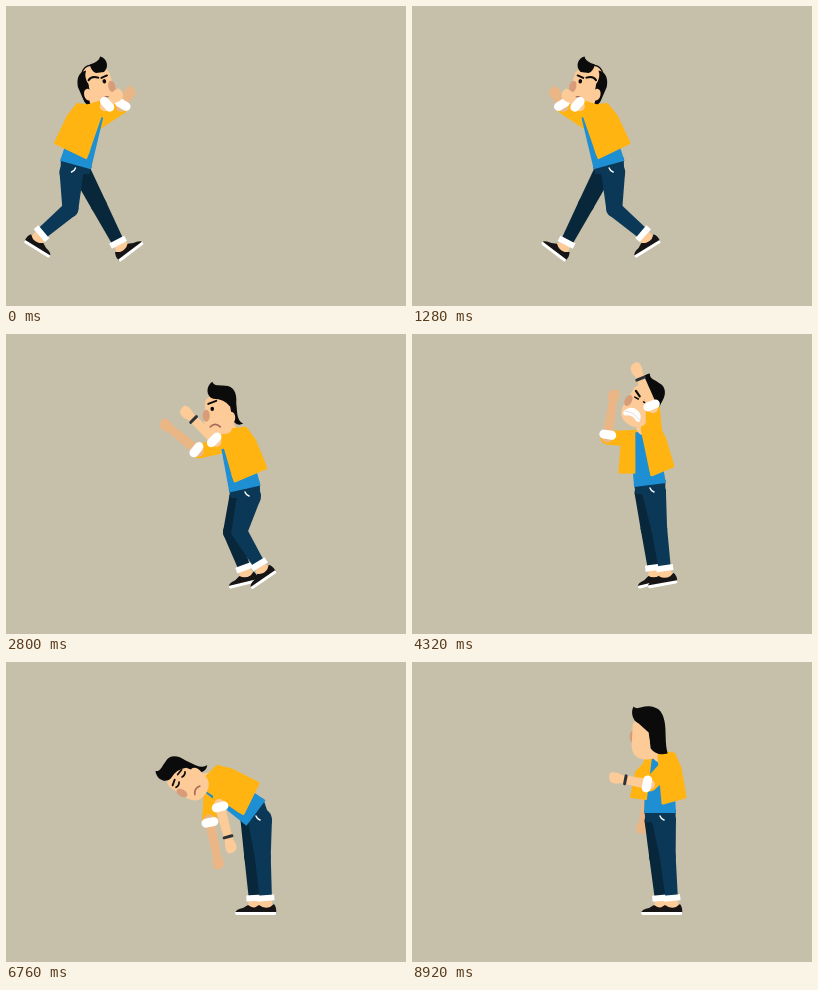
Recreate the animation shown at these times as an HTML page with a canvas. Size 400 by 300 pixels, loop 8960 ms.

```html
<!DOCTYPE html>
<html lang="en">
<head>
<meta charset="utf-8">
<title>Pacing man</title>
<style>
html, body { margin: 0; width: 100%; height: 100%; overflow: hidden; background: #c6c0aa; }
canvas { display: block; width: 400px; height: 300px; }
</style>
</head>
<body>
<canvas id="stage"></canvas>
<script>
const LOOP = 8960, STEP = 40, SPEED = 0.28, CYCLE = 640;
const TURNS = [859, 1671, 2500];
const WALK_END = 2660, STOP = 2800, BEAT = 255;
const C = {
  bg: '#c6c0aa', coat: '#ffb412', shirt: '#1e8fd2', near: '#0c3858', far: '#08273a',
  skin: '#fccb98', shade: '#eab686', nose: '#d99c78', lip: '#a8685a', hair: '#0c0b0c',
  white: '#ffffff', shoe: '#161415', watch: '#2c3338'
};

const canvas = document.getElementById('stage');
const g = canvas.getContext('2d');
const ratio = window.devicePixelRatio || 1;
canvas.width = 400 * ratio;
canvas.height = 300 * ratio;

const clamp = v => Math.max(0, Math.min(1, v));
const smooth = v => { v = clamp(v); return v * v * (3 - 2 * v); };
const mix = (a, b, k) => Array.isArray(a) ? a.map((v, i) => mix(v, b[i], k))
  : typeof a === 'number' ? a + (b - a) * k : k < .5 ? a : b;
const blend = (p, q, k) =>
  Object.fromEntries(Object.keys(p).map(key => [key, mix(p[key], q[key], k)]));

// Ankle x, y and angle; raising the heel tips the shoe forward.
const foot = (x, heel = 0) => [x, 238 - 6 * heel, -.6 * heel];

// Arms hold upper and lower angles: 0 hangs down, a quarter turn points ahead.
const STAND = {
  x: 248, y: 151, lean: 0, tilt: 0, near: [-.2, .15], far: [.1, .2], reach: 38,
  nearFoot: foot(260), farFoot: foot(249), open: 1, mood: 'sad'
};
const CRY = { ...STAND, x: 239, y: 155, lean: -.22, near: [1.5, 2.35], far: [1.3, 2.25],
  nearFoot: foot(254, 1), farFoot: foot(239, .4), reach: 42, open: 0 };
const ROAR = { ...STAND, x: 238, lean: -.12, tilt: .5, near: [3.1, 2.75], far: [1.6, 3.3],
  nearFoot: foot(253, .3), farFoot: foot(242, .4), reach: 42, mood: 'rage' };
const SHAKE = { ...STAND, x: 252, y: 157, tilt: .5, near: [1.4, 2.87], far: [1.5, 2.97],
  nearFoot: foot(277, .4), farFoot: foot(249), reach: 36, mood: 'rage' };
const STAGGER = { ...SHAKE, x: 260, near: [.9, 2], far: [1, 2.2], nearFoot: foot(287, .3) };
const SIGH = { ...STAND, x: 251, lean: .07, tilt: .3, near: [-.7, .2], mood: 'closed' };
const BENT = { ...STAND, x: 250, lean: -.96, tilt: -1.05, near: [.15, -.26], far: [.1, -.2],
  reach: 44, open: 0, mood: 'closed' };
const CHECK = { ...STAND, tilt: -.05, near: [.8, 1.76], far: [.2, .1], reach: 35 };
const LOOK = { ...CHECK, tilt: 0, far: [.07, .2], mood: 'away' };

const tantrum = [ROAR, SHAKE, CRY];
const KEYS = [[STOP, CRY]];
for (let i = 1; i <= 10; i++) KEYS.push([STOP + i * BEAT, tantrum[i % 3]]);
KEYS.push([5640, STAGGER], [6040, STAND], [6400, SIGH], [6680, BENT], [7420, BENT],
  [7840, STAND], [8200, CHECK], [8400, CHECK], [8640, LOOK], [LOOP, LOOK]);

function walkX(t) {
  return TURNS.reduce((x, at, i) => x + (i % 2 ? 2 : -2) * SPEED * Math.max(0, t - at), 72 + SPEED * t);
}

function stride(x, phase) {
  const p = phase % 1;
  if (p < .5) {
    const push = smooth((p - .3) / .2);
    return [x + mix(-41, 38, p * 2), 238 - 9 * push, .65 * (1 - clamp(p / .12)) - .55 * push];
  }
  const s = p * 2 - 1, swing = Math.sin(Math.PI * s);
  return [x + mix(38, -41, smooth(s)), 238 - 9 * (1 - s) - 14 * swing, mix(-.55, .65, s) - .35 * swing];
}

function walkPose(t) {
  const x = walkX(t), p = t / CYCLE;
  return { ...STAND, x: x + 2.5, y: 157 + 2 * Math.cos(4 * Math.PI * p), lean: -.27, tilt: .25,
    near: [1.93, 2.3], far: [2.1, 2.6], reach: 16, open: 0, mood: 'held',
    nearFoot: stride(x, p + .5), farFoot: stride(x, p) };
}

function poseAt(t) {
  if (t < STOP) return blend(walkPose(t), CRY, smooth((t - WALK_END) / (STOP - WALK_END)));
  const i = KEYS.findIndex(k => k[0] > t);
  const [t0, a] = KEYS[i - 1], [t1, b] = KEYS[i];
  const k = (t - t0) / (t1 - t0);
  const pose = blend(a, b, smooth(k));
  if (a === BENT && b === BENT) pose.lean += .03 * Math.sin(k * 4 * Math.PI);
  return pose;
}

function fill(path, color) {
  g.fillStyle = color;
  g.fill(new Path2D(path));
}
function line(path, color, width, cap = 'round') {
  g.strokeStyle = color;
  g.lineWidth = width;
  g.lineCap = cap;
  g.lineJoin = 'round';
  g.stroke(new Path2D(path));
}
function oval(x, y, rx, ry, color) {
  g.fillStyle = color;
  g.beginPath();
  g.ellipse(x, y, rx, ry, 0, 0, 7);
  g.fill();
}
function poly(points, color, round = 0) {
  const path = 'M' + points.join('L') + 'Z';
  fill(path, color);
  if (round) line(path, color, round);
}
function at(x, y, angle, draw) {
  g.save();
  g.translate(x, y);
  g.rotate(angle);
  draw();
  g.restore();
}

// Tapered bone with round joints; the end may be cut flat.
function limb(a, b, wa, wb, color, flat) {
  const dx = b[0] - a[0], dy = b[1] - a[1], d = Math.hypot(dx, dy) || 1;
  const side = (p, w) => [p[0] - dy / d * w / 2, p[1] + dx / d * w / 2];
  poly([side(a, wa), side(b, wb), side(b, -wb), side(a, -wa)], color);
  oval(...a, wa / 2, wa / 2, color);
  if (!flat) oval(...b, wb / 2, wb / 2, color);
}

function knee(hip, ankle) {
  const up = 37, low = 40;
  const dx = ankle[0] - hip[0], dy = ankle[1] - hip[1];
  const d = Math.hypot(dx, dy), reach = Math.min(d, up + low);
  const along = (up * up - low * low + reach * reach) / (2 * reach);
  const out = Math.sqrt(Math.max(0, up * up - along * along));
  return [hip[0] + (dx * along - dy * out) / d, hip[1] + (dy * along + dx * out) / d];
}

function leg(hip, [x, y, angle], top, color) {
  const k = knee(hip, [x, y]);
  at(x, y, angle, () => {
    fill('M-5,-3 H5 L7,9 H-8 Z', C.skin);
    fill('M-20,13 Q-19,9 -12,8 L-7,5 Q-2,9 4,7 L8,4 Q11,8 10,13 Z', C.shoe);
    fill('M-20,12 H10 V14 Q10,15 8,15 H-18 Q-20,15 -20,12 Z', C.white);
  });
  limb(hip, k, top, 16, color);
  limb(k, [x, y], 16, 12, color, true);
  at(x, y, Math.atan2(y - k[1], x - k[0]) - Math.PI / 2, () =>
    line('M-5.5,-2 H5.5', C.white, 6, 'square'));
}

const swing = ([x, y], angle, length) =>
  [x - Math.sin(angle) * length, y + Math.cos(angle) * length];

function arm(shoulder, [upper, lower], reach, skin, watch) {
  const elbow = swing(shoulder, upper, 28), hand = swing(elbow, lower, reach);
  limb(shoulder, elbow, 17, 14, C.coat);
  limb(elbow, hand, 10, 8, skin);
  at(...hand, lower + Math.PI / 2, () => {
    fill('M-6,-4 Q-1,-7 4,-5 Q8,-1 6,4 Q1,7 -6,4 Z', skin);
    if (watch) line('M-10,-4 V4', C.watch, 3);
  });
  at(...elbow, lower + Math.PI / 2, () => line('M3,-4 V4', C.white, 9));
}

function face(mood) {
  oval(-13, 0, 3.5, 6, C.nose);
  if (mood === 'sad' || mood === 'held') {
    oval(-7, -7, 1.8, 2.2, C.hair);
    line(mood === 'sad' ? 'M-11,-12 L-3,-15' : 'M-11,-12 L-5,-11 M-2,-12 Q4,-16 8,-12', C.hair, 2);
    line('M-9,11 Q-4,6 1,11', C.lip, 1.6);
  } else if (mood === 'rage') {
    line('M-11,-12 L-5,-9 M9,-14 L1,-9', C.hair, 2.2);
    line('M-9,-6 H-5 M1,-6 H5', C.hair, 1.6);
    fill('M-12,12 Q-10,4 -2,4 Q6,5 7,13 Q5,16 1,13 Q-4,11 -9,15 Q-12,15 -12,12 Z', C.white);
    line('M-11,11 Q-3,7 6,12', '#ddd3cf', .7);
  } else {
    line('M-11,-8 Q-8,-6 -5,-8 M1,-8 Q4,-6 7,-8', C.hair, 1.7);
    line('M-11,-12 L-5,-13 M1,-13 L7,-12', C.hair, 1.8);
    line('M-8,12 Q-3,8 2,12', C.lip, 1.6);
  }
}

function head(x, y, angle, mood) {
  at(x, y, angle, () => {
    if (mood === 'away') oval(-14, -2, 3, 6, C.nose);
    fill('M-14,-14 Q-12,-21 0,-21 Q15,-20 15,-5 L14,10 Q11,21 0,21 Q-14,21 -15,8 Z', C.skin);
    if (mood === 'away') {
      fill('M-8,-15 C-15,-18 -16,-28 -13,-32 C-9,-27 -4,-35 8,-31 C18,-28 19,-14 19,-2 Q19,8 21,15 Q10,18 4,10 L2,-6 Z', C.hair);
      oval(-1, 3, 4, 6, C.skin);
      return;
    }
    if (mood === 'held') {
      oval(5, -16, 9, 9, C.skin);
      fill('M-9,-16 C-16,-20 -15,-29 -9,-32 Q-7,-27 3,-27 Q3,-20 -1,-17 Z', C.hair);
      fill('M8,-22 Q19,-22 20,-8 L18,5 Q17,13 12,12 Q13,6 10,2 L9,-8 Q12,-16 8,-22 Z', C.hair);
      line('M3,-26 Q9,-27 13,-20', C.hair, 1.4);
    } else {
      fill('M-6,-17 C-13,-19 -14,-29 -7,-34 C-5,-29 0,-31 6,-30 C14,-30 18,-23 17,-13 L18,-2 Q19,6 24,8 Q16,11 13,3 L11,-9 Q5,-17 -6,-17 Z', C.hair);
    }
    oval(12, 2, 4, 6, C.skin);
    face(mood);
  });
}

function man(p) {
  const { x, y, lean, open, mood } = p, size = 57;
  const cos = Math.cos(lean), sin = Math.sin(lean);
  const neck = [x + sin * size, y - cos * size];
  const body = (u, v) => [neck[0] + cos * u - sin * v, neck[1] + sin * u + cos * v];
  const nod = p.tilt - .65;
  const skull = [neck[0] + 22 * Math.sin(nod), neck[1] - 22 * Math.cos(nod)];

  arm(body(-9, 9), p.far, p.reach, C.shade, false);
  leg([x - 6, y + 7], p.farFoot, 19, C.far);
  leg([x + 4, y + 7], p.nearFoot, 24, C.near);
  poly([body(-16, size - 3), body(16, size - 3), [x + 15, y + 9], [x - 14, y + 9]], C.near);
  line(`M${x},${y + 3} q1,3 4,4`, C.white, 1.4);

  poly([body(-14, 4), body(13, 0), body(16, size), body(-16, size)], C.shirt);
  limb(neck, mix(neck, skull, .6), 13, 13, C.skin);
  poly([body(-9, 1), body(mix(-9, -24, open), 16), body(mix(-9, -29, open), 41),
    body(mix(-9, -14, open), 43)], C.coat, 2);
  poly([body(mix(-11, -1, open), 1), body(0, -4), body(14, -2), body(20, 12), body(25, 41),
    body(mix(-8, 3, open), 47)], C.coat, 3);
  head(...skull, p.tilt, mood);
  arm(body(10, 9), p.near, p.reach, C.skin, mood !== 'held');
}

function draw(t) {
  g.setTransform(ratio, 0, 0, ratio, 0, 0);
  g.fillStyle = C.bg;
  g.fillRect(0, 0, 400, 300);
  const turned = TURNS.filter(at => t >= at).length % 2;
  if (t < WALK_END && !turned) {
    g.translate(2 * walkX(t), 0);
    g.scale(-1, 1);
  }
  man(poseAt(t));
}

const start = performance.now();
function tick() {
  const t = (performance.now() - start) % LOOP;
  draw(Math.floor(t / STEP) * STEP);
  requestAnimationFrame(tick);
}
tick();
</script>
</body>
</html>
```
